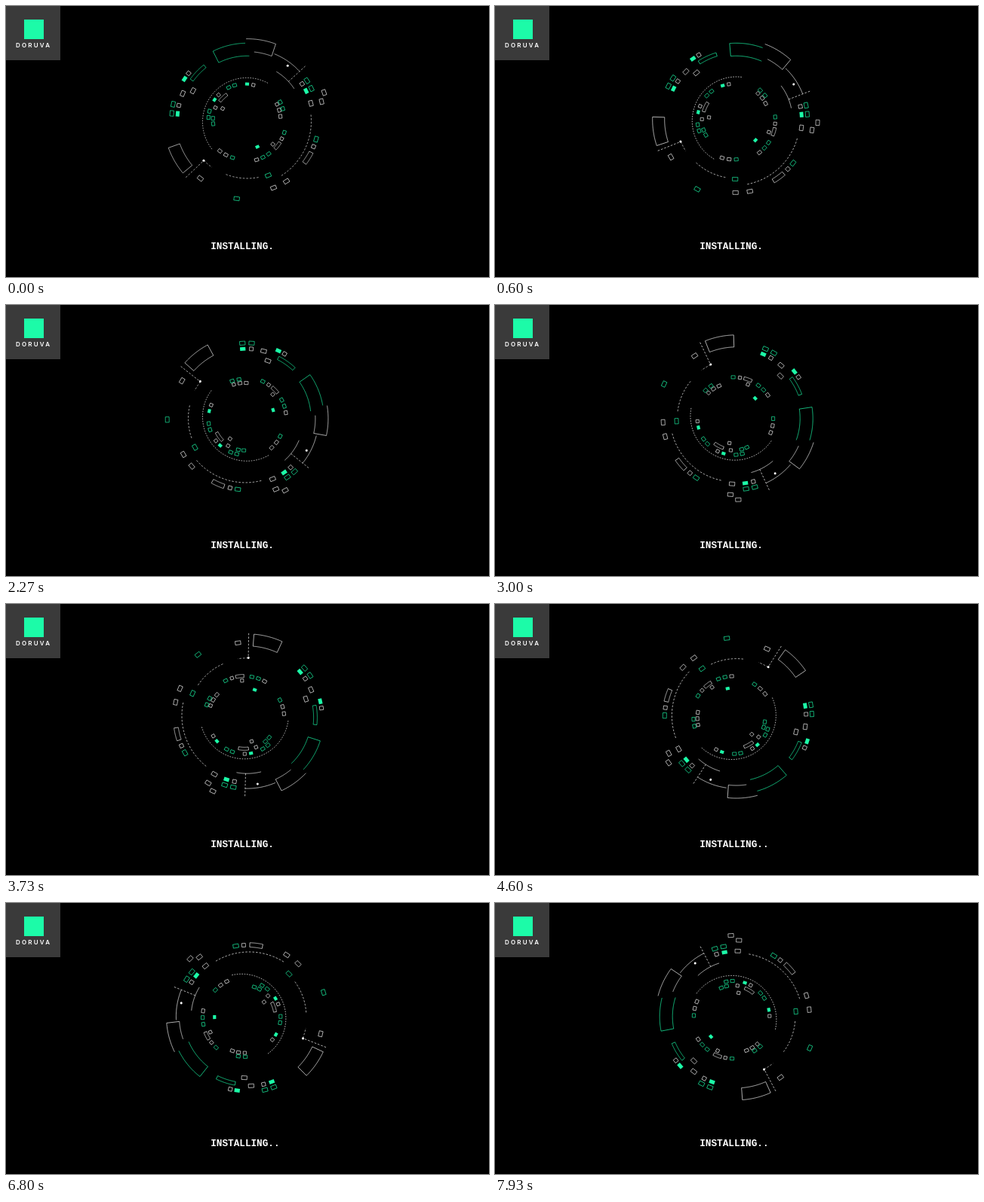
These frames come from a looping animation (640x360 px, 8000 ms). An HTML page with a canvas:

```html
<!DOCTYPE html>
<html lang="en">
<head>
<meta charset="utf-8">
<title>Installing</title>
<style>
  html, body { margin: 0; height: 100%; overflow: hidden; background: #000; }
  canvas { display: block; width: 100vw; height: 100vh; }
</style>
</head>
<body>
<canvas id="stage" width="640" height="360"></canvas>
<script>
const ctx = document.getElementById('stage').getContext('2d');
const WHITE = '#f2f2f2', MINT = '#1cfba8';
const FPS = 15, FRAMES = 120, STEP = 2.4;   // degrees turned per frame
const DASH = [2.6, 2], FINE_DASH = [1.7, 1.6];
const rad = deg => deg * Math.PI / 180;
const polar = (deg, r) => [r * Math.cos(rad(deg)), r * Math.sin(rad(deg))];

// Arc around the pivot; shift moves its centre away from the direction shiftAngle.
function traceArc(r, from, to, shift = 0, shiftAngle = 0) {
  const steps = 48;
  for (let i = 0; i <= steps; i++) {
    const a = from + (to - from) * i / steps;
    ctx.lineTo(...polar(a, r - shift * Math.cos(rad(a - shiftAngle))));
  }
}

function strokePath(color, dash, trace) {
  ctx.strokeStyle = color;
  ctx.setLineDash(dash);
  ctx.beginPath();
  trace();
  ctx.stroke();
  ctx.setLineDash([]);
}

const arc = (dash, ...shape) =>
  strokePath(WHITE, dash, () => traceArc(...shape));

const spoke = (angle, r1, r2) => strokePath(WHITE, DASH, () => {
  ctx.moveTo(...polar(angle, r1));
  ctx.lineTo(...polar(angle, r2));
});

function block(color, r1, r2, from, to) {
  strokePath(color, [], () => {
    traceArc(r1, from, to);
    traceArc(r2, to, from);
    ctx.closePath();
  });
}

function dot(angle, r) {
  ctx.fillStyle = '#fff';
  ctx.beginPath();
  ctx.arc(...polar(angle, r), 1.5, 0, 2 * Math.PI);
  ctx.fill();
}

// Tiles along a ring, one slot per letter:
// g green, w white, s white square, f filled, dot empty.
function row([length, depth], r, start, step, slots) {
  [...slots].forEach((kind, i) => {
    if (kind === '.') return;
    const width = kind === 's' ? depth : length;
    ctx.strokeStyle = ctx.fillStyle = 'gf'.includes(kind) ? MINT : WHITE;
    ctx.save();
    ctx.rotate(rad(start + i * step));
    ctx[kind === 'f' ? 'fillRect' : 'strokeRect'](r - depth / 2, -width / 2, depth, width);
    ctx.restore();
  });
}

function outerRing() {
  const tiles = (...slots) => row([7.2, 4.9], ...slots);
  const single = (kind, r, angle) => tiles(r, angle, 0, kind);
  const cluster = (r, angle, step) => {
    tiles(r, angle, step, 'fs');
    tiles(r + 7.7, angle, step, 'gg');
  };

  block(WHITE, 95, 111, 140.2, 160.2);
  strokePath(MINT, [], () => {
    traceArc(101.5, 268.5, 243.4);
    traceArc(84.5, 243.4, 271.8);
  });
  strokePath(WHITE, [], () => {
    traceArc(107.2, 269.2, 290.6);
    traceArc(90.2, 291, 275.8);
  });
  arc([], 94.3, 292.4, 317.2);
  arc([], 74.4, 301.3, 326.6);
  spoke(317.3, 74.3, 104.8);
  dot(306.8, 89.3);
  spoke(136.6, 112, 79.5);
  arc(DASH, 79, 136.6, 126.4);
  dot(136.7, 79.4);
  arc(DASH, 86, -4.3, 59.5, 2.5, -60);
  arc(DASH, 78.2, 79, 112.4);

  block(MINT, 87.9, 92.7, 215.4, 231.6);
  block(WHITE, 92.3, 98.1, 27.2, 37.4);
  cluster(92.6, 184.7, 7);
  cluster(86.7, -25.9, -7.2);
  tiles(99.1, 213, 5.3, 'fs');
  tiles(94.9, 16, 6.3, 'gs');
  tiles(97.1, 57.7, 11.3, 'ww');
  single('w', 92.2, 202);
  single('w', 81.4, 208);
  single('w', 87, -14.3);
  single('w', 101.3, -13.6);
  single('w', 107.9, -19.4);
  single('w', 99.9, 128.5);
  single('g', 79.2, 69.5);
  single('g', 106, 97.6);
}

function innerRing() {
  const tiles = (...slots) => row([5.1, 4.1], ...slots);

  arc(FINE_DASH, 58.5, 138, 304, 4, 221);
  block(WHITE, 39, 43, 217, 235.6);
  block(WHITE, 53.6, 57.8, 32.4, 43.6);
  tiles(47.8, 183.9, 10.03, 'gg.fs.gg.fs....sww');
  tiles(41.8, 172.9, 10, 'gg.s');
  tiles(53, -26.4, 10.1, 'gg');
  tiles(55.4, 17.6, 9.25, 'gs..ggw');
  tiles(52.6, 107.6, 10.35, 'gww');
  tiles(49.6, 40.7, 0, 's');
  tiles(39.7, 64.4, 0, 'f');
  tiles(32.6, 207.5, 0, 's');
}

function ring(x, y, angle, draw) {
  ctx.save();
  ctx.translate(x, y);
  ctx.rotate(rad(angle));
  draw();
  ctx.restore();
}

function label(text, x, y, font, spacing = '0px') {
  ctx.font = font;
  ctx.letterSpacing = spacing;
  ctx.fillStyle = '#fff';
  ctx.fillText(text, x, y);
}

function badge() {
  ctx.fillStyle = '#3a3a3a';
  ctx.fillRect(0, 0, 72, 72);
  ctx.fillStyle = MINT;
  ctx.fillRect(24, 18, 26, 26);
  label('DORUVA', 13, 55.2, '600 8px Inter, sans-serif', '2.2px');
}

function render(now) {
  const frame = Math.floor(now * FPS / 1000 + 0.1) % FRAMES;
  ctx.fillStyle = '#000';
  ctx.fillRect(0, 0, 640, 360);
  ctx.lineWidth = 0.65;
  ring(319.7, 150.8, frame * STEP, outerRing);
  ring(316, 151.3, -frame * STEP, innerRing);
  badge();
  const dots = frame < FRAMES / 2 ? '.' : '..';
  label('INSTALLING' + dots, 271.2, 323.3, 'bold 12.7px "Liberation Mono", monospace');
}

let start;
function tick(now) {
  start ??= now;
  render(now - start);
  requestAnimationFrame(tick);
}
render(0);
requestAnimationFrame(tick);
</script>
</body>
</html>
```
